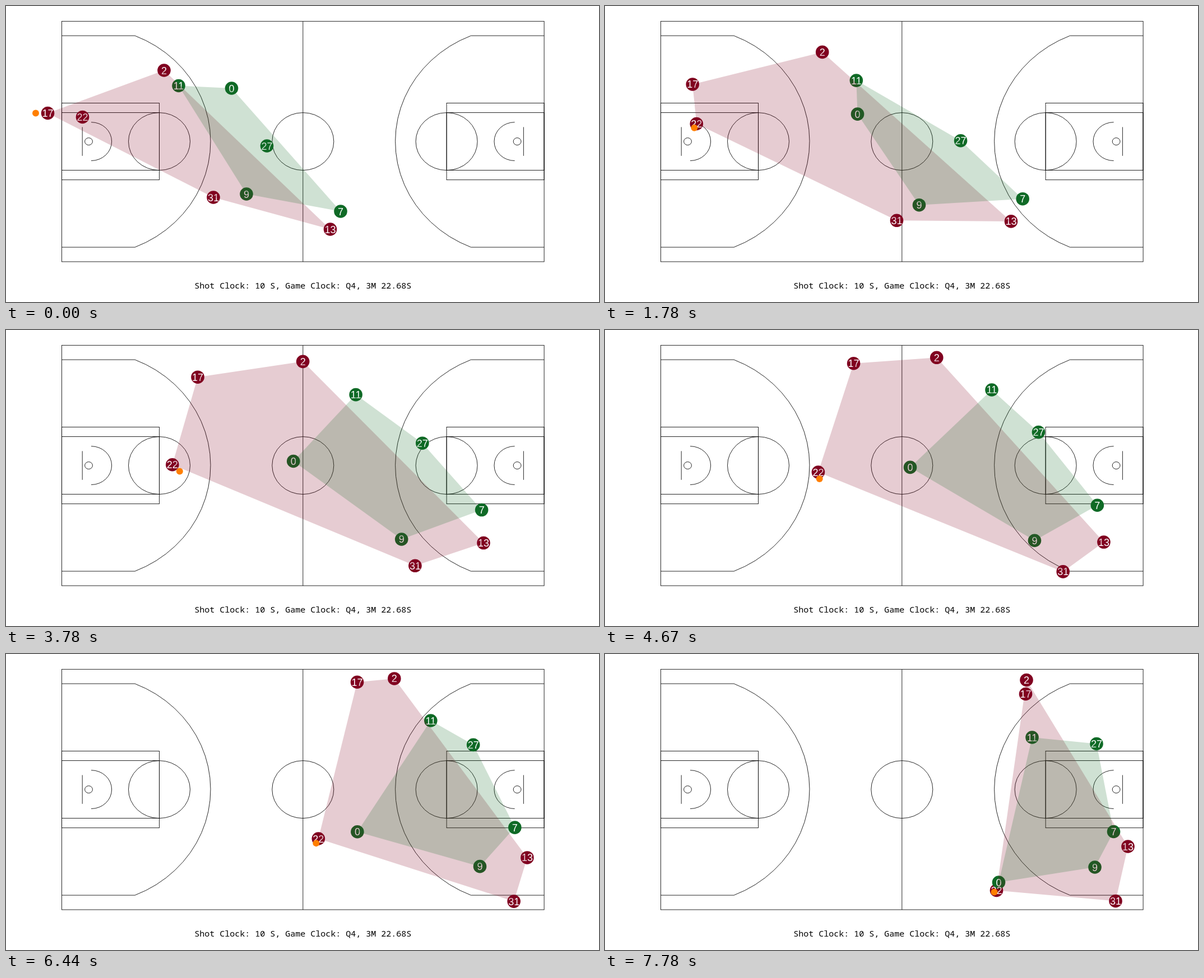
These frames come from a looping animation (1058 px wide and 529 px high, 8000 ms). An HTML page with a canvas:

```html
<!DOCTYPE html>
<html lang="en">
<head>
<meta charset="utf-8">
<title>Basketball possession</title>
<style>
  html, body { margin: 0; width: 100%; height: 100%; overflow: hidden; background: #fff; }
  canvas { display: block; }
</style>
</head>
<body>
<canvas id="stage" width="1058" height="529"></canvas>
<script>
const ctx = document.getElementById('stage').getContext('2d');
const LOOP = 8000, STEPS = 36;
const RED = '#800020', GREEN = '#0f6a26', ORANGE = '#ff7f00';
const MID_X = 529.8, MID_Y = 242.1;

// Each player runs a smooth curve through a few court positions at these steps.
const KEY_STEPS = [0, 4, 12, 25, 35];
const player = (label, ...path) => ({ label, path });
const redTeam = [
  player('17', [74.5, 191.5], [101, 164.5], [230, 117], [540, 47], [750.5, 71.5]),
  player('2', [282, 115], [329, 98], [451, 69], [647, 45], [752, 46.5]),
  player('22', [136.5, 198.5], [135, 199], [212.5, 227], [468, 282], [698.5, 422.5]),
  player('31', [370, 342], [434, 362], [614, 403], [879, 439], [911, 441.5]),
  player('13', [578.5, 399], [652.5, 389.5], [789, 382.5], [916.5, 374], [933, 344])
];
const greenTeam = [
  player('11', [308, 142.5], [369, 138.5], [531, 127], [736.5, 107], [762, 149]),
  player('0', [402.5, 147], [426, 168], [477, 218], [582, 271], [702.5, 408]),
  player('27', [465.5, 250], [562.5, 251], [690, 225], [803, 168.5], [877, 160.5]),
  player('9', [429, 336], [494.5, 344], [625, 367], [814.5, 378], [874, 381]),
  player('7', [597, 367], [680, 356], [797, 334], [898.5, 309], [907.5, 317.5])
];

// Hermite curve through unevenly spaced values.
function curve(values, step) {
  const last = values.length - 1;
  const gap = k => KEY_STEPS[k + 1] - KEY_STEPS[k];
  const rate = k => (values[k + 1] - values[k]) / gap(k);
  const slope = k => {
    if (k === 0) return (3 * rate(0) - slope(1)) / 2;
    if (k === last) return (3 * rate(k - 1) - slope(k - 1)) / 2;
    return (rate(k - 1) * gap(k) + rate(k) * gap(k - 1)) / (gap(k - 1) + gap(k));
  };
  let i = 0;
  while (i < last - 1 && step >= KEY_STEPS[i + 1]) i++;
  const u = (step - KEY_STEPS[i]) / gap(i), v = 1 - u;
  return values[i] * v * v * (1 + 2 * u) + values[i + 1] * u * u * (3 - 2 * u) +
    gap(i) * u * v * (slope(i) * v - slope(i + 1) * u);
}

const positionAt = ({ path }, step) => [0, 1].map(axis => curve(path.map(p => p[axis]), step));

// Passed in from the baseline, then dribbled around the carrier.
function ballAt([x, y], step) {
  const passed = Math.min(1, step / 4.6);
  const side = 17 * Math.exp(-(((step - 17) / 4) ** 2)) - 4;
  const front = 12 * Math.sin(Math.PI * step / 38);
  return [53 + (x + side - 53) * passed, 191.5 + (y + front - 191.5) * passed];
}

function convexHull(points) {
  const sorted = [...points].sort((a, b) => a[0] - b[0] || a[1] - b[1]);
  const chain = list => {
    const out = [];
    for (const p of list) {
      while (out.length > 1) {
        const [a, b] = out.slice(-2);
        if ((b[0] - a[0]) * (p[1] - a[1]) - (b[1] - a[1]) * (p[0] - a[0]) > 0) break;
        out.pop();
      }
      out.push(p);
    }
    return out.slice(0, -1);
  };
  return [...chain(sorted), ...chain(sorted.reverse())];
}

function drawHull(points, color) {
  ctx.globalAlpha = 0.2;
  ctx.fillStyle = color;
  ctx.beginPath();
  convexHull(points).forEach(p => ctx.lineTo(...p));
  ctx.fill();
  ctx.globalAlpha = 1;
}

function disc([x, y], radius, color) {
  ctx.fillStyle = color;
  ctx.beginPath();
  ctx.arc(x, y, radius, 0, 2 * Math.PI);
  ctx.fill();
}

function drawLabels(team, points) {
  ctx.font = '18px "Liberation Sans", Arial, sans-serif';
  ctx.fillStyle = '#fff';
  team.forEach(({ label }, i) => ctx.fillText(label, points[i][0], points[i][1] + 6.5));
}

function line(...points) {
  ctx.beginPath();
  points.forEach(p => ctx.lineTo(...p));
  ctx.stroke();
}

function ellipse(x, rx, ry, from = 0, to = 2 * Math.PI) {
  ctx.beginPath();
  ctx.ellipse(x, MID_Y, rx, ry, 0, from, to);
  ctx.stroke();
}

function drawHalfCourt() {
  const reach = Math.asin(189 / 204.25);
  for (const half of [68.6, 51.5]) ctx.strokeRect(99.5, MID_Y - half, 174, 2 * half);
  ellipse(273.5, 55, 51.5);
  ellipse(147.5, 6.9, 6.5);
  ellipse(152, 36.6, 34.4, -Math.PI / 2, Math.PI / 2);
  line([136.2, MID_Y - 25.7], [136.2, MID_Y + 25.7]);
  ellipse(147.6, 217.4, 204.25, -reach, reach);
  for (const side of [-189, 189]) line([99.5, MID_Y + side], [230, MID_Y + side]);
}

function drawCourt() {
  ctx.strokeStyle = '#000';
  ctx.lineWidth = 0.85;
  ctx.strokeRect(99.5, 27.3, 860.6, 429.7);
  line([MID_X, 27.3], [MID_X, 457]);
  ellipse(MID_X, 55, 51.5);
  drawHalfCourt();
  ctx.save();
  ctx.translate(2 * MID_X, 0);
  ctx.scale(-1, 1);
  drawHalfCourt();
  ctx.restore();
}

function draw(now) {
  const step = Math.min(STEPS - 1, Math.floor((now % LOOP + 4.5) * STEPS / LOOP));
  const reds = redTeam.map(m => positionAt(m, step));
  const greens = greenTeam.map(m => positionAt(m, step));
  const carrier = reds[redTeam.findIndex(m => m.label === '22')];

  ctx.fillStyle = '#fff';
  ctx.fillRect(0, 0, 1058, 529);
  drawCourt();

  ctx.textAlign = 'center';
  reds.forEach(p => disc(p, 11.8, RED));
  greens.forEach(p => disc(p, 11.8, GREEN));
  drawLabels(redTeam, reds);
  drawLabels(greenTeam, greens);
  drawHull(reds, RED);
  drawHull(greens, GREEN);
  disc(ballAt(carrier, step), 6, ORANGE);

  ctx.fillStyle = '#000';
  ctx.font = '15px "Noto Sans Mono", monospace';
  ctx.fillText('Shot Clock: 10 S, Game Clock: Q4, 3M 22.68S', MID_X, 505);
}

const start = performance.now();
function tick() {
  draw(performance.now() - start);
  requestAnimationFrame(tick);
}
tick();
</script>
</body>
</html>
```
